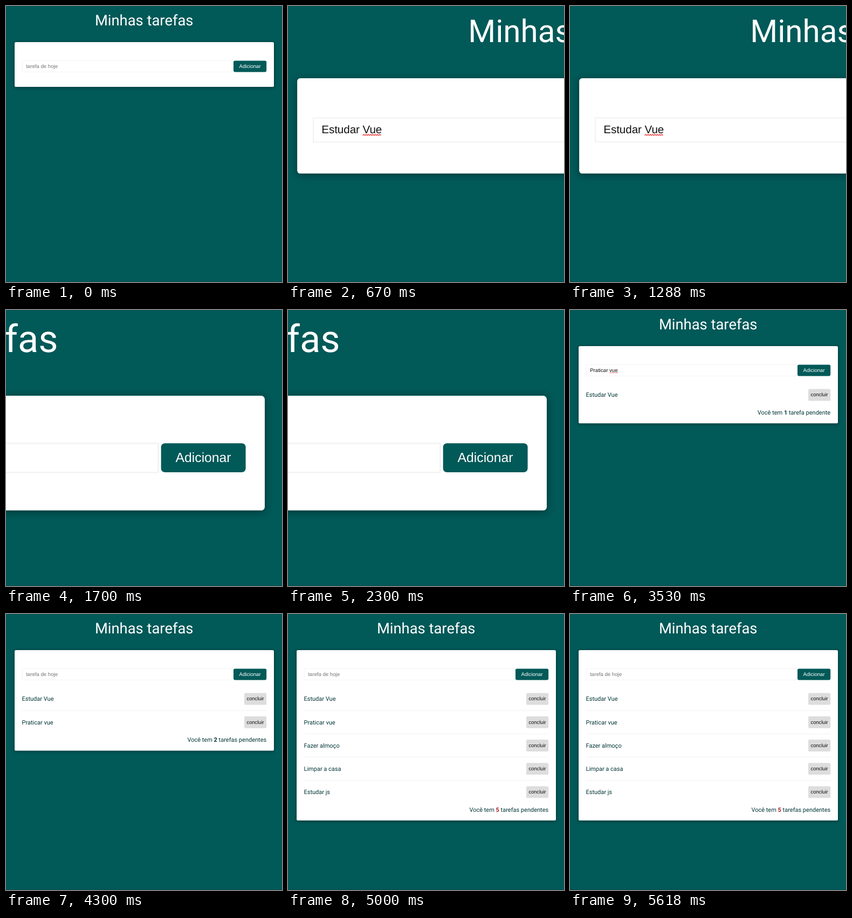
An HTML page for the animation above (6.03 s loop, 512 by 512 pixels).

```html
<!DOCTYPE html>
<html lang="pt-BR">
<head>
<meta charset="utf-8">
<title>Minhas tarefas</title>
<style>
  html, body { margin: 0; width: 100%; height: 100%; overflow: hidden; background: #015958; }
  svg { display: block; width: 100%; height: 100%; }
  text { font: 11px Roboto, sans-serif; fill: #023535; text-rendering: geometricPrecision; white-space: pre; }
  .title { font-size: 27.4px; fill: #fff; text-anchor: middle; }
  .card { fill: #fff; filter: drop-shadow(0 1px 3px rgba(0, 0, 0, .4)); }
  .field { fill: #fff; stroke: #f3f3f3; }
  .add { fill: #015958; }
  .done { fill: #ddd; }
  .ui { font: 9.65px "Liberation Sans", Arial, sans-serif; }
  .mid { text-anchor: middle; }
  .small { font-size: 9.4px; fill: #111; }
  .end { text-anchor: end; }
  .rule { stroke: #f1f1f1; }
  .spell { fill: none; stroke: #f05a5a; stroke-width: .8; }
  .bold { font-weight: 700; }
</style>
</head>
<body>
<svg viewBox="0 0 512 512">
  <g id="page">
    <text class="title" x="256.2" y="35.5">Minhas tarefas</text>
    <rect class="card" id="card" x="16" y="67" width="481" rx="2.6"/>
    <rect class="field" x="30" y="101.5" width="390" height="21"/>
    <text class="ui" id="entry" x="37.2" y="115"></text>
    <path class="spell" id="spell"/>
    <rect class="add" x="422" y="101.4" width="61.2" height="21" rx="2.8"/>
    <text class="ui mid" x="452.6" y="115" style="fill:#fff">Adicionar</text>
    <g id="list"></g>
  </g>
  <rect y="511" width="512" height="1" fill="#014b4a"/>
</svg>
<script>
const LOOP = 6030, ROW = 43.2;
const TASKS = ["Estudar Vue", "Praticar vue", "Fazer almoço", "Limpar a casa", "Estudar js"];
const NO_ZOOM = [1, 0, 0];
// start time, typed text, number of tasks, view as [scale, x, y]
const STEPS = [
  [0, "", 0, NO_ZOOM],
  [670, "Estudar Vue", 0, [2.13, -17, -8.7]],
  [1700, "Estudar Vue", 0, [2.565, -794.8, -12.9]],
  [2700, "", 1, NO_ZOOM],
  [3530, "Praticar vue", 1, NO_ZOOM],
  [4300, "", 2, NO_ZOOM],
  [5000, "", 5, NO_ZOOM]
];
const $ = id => document.getElementById(id);

function squiggle(from, to) {
  let d = `M${from} 116.8`;
  for (let x = from + 1, up = true; x <= to; x++, up = !up) d += `L${x} ${up ? 115.9 : 116.8}`;
  return d;
}

function taskRow(name, i) {
  const y = i * ROW;
  const rule = i ? `<path class="rule" d="M30 ${y + 135.8}H483"/>` : "";
  return `${rule}<text x="29.5" y="${y + 161.4}">${name}</text>
    <rect class="done" x="442" y="${y + 146.6}" width="41.2" height="21.9" rx="2.6"/>
    <text class="ui mid small" x="462.6" y="${y + 160.4}">concluir</text>`;
}

function summary(count) {
  const s = count > 1 ? "s" : "";
  const color = count >= 5 ? "#b22222" : "#023535";
  return `<text class="end" x="483.2" y="${194 + (count - 1) * ROW}">Você tem <tspan class="bold" style="fill:${color}">${count}</tspan> tarefa${s} pendente${s}</text>`;
}

function show([, typed, count, [scale, x, y]]) {
  $("page").setAttribute("transform", `translate(${x} ${y}) scale(${scale})`);
  $("card").setAttribute("height", count ? 143.3 + (count - 1) * ROW : 83);
  $("entry").textContent = typed || "tarefa de hoje";
  $("entry").style.fill = typed ? "#111" : "#757575";
  $("spell").setAttribute("d", typed ? squiggle(73, 89) : "");
  $("list").innerHTML = count ? TASKS.slice(0, count).map(taskRow).join("") + summary(count) : "";
}

let current;
function tick() {
  const t = performance.now() % LOOP;
  const step = STEPS.findLast(s => s[0] <= t);
  if (step !== current) show(current = step);
  requestAnimationFrame(tick);
}
tick();
</script>
</body>
</html>
```
